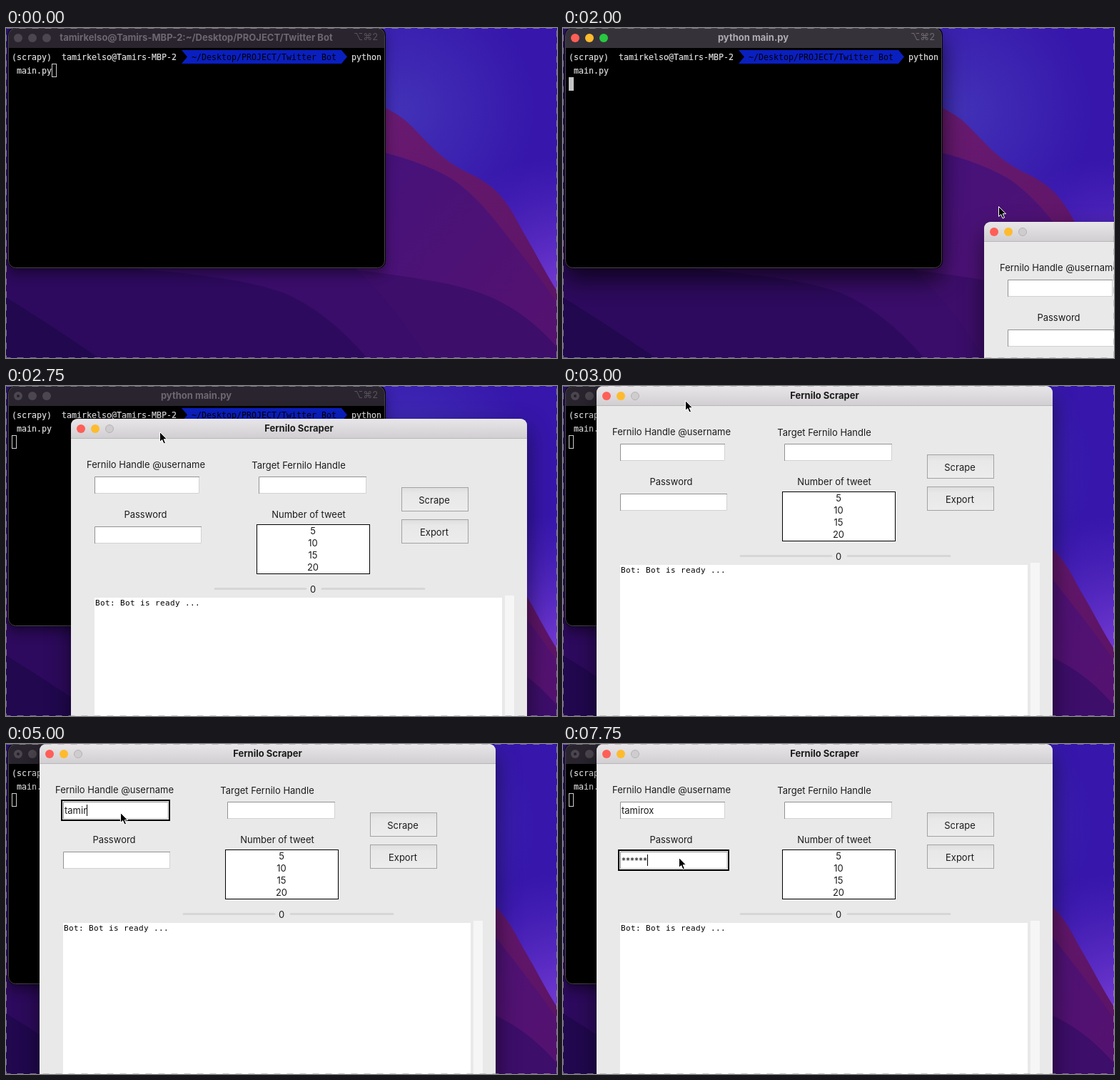
An HTML page for the animation above (8000 ms loop, 772x463 px).

```html
<!DOCTYPE html>
<html lang="en">
<head>
<meta charset="utf-8">
<title>Scraper demo</title>
<style>
  html, body { margin: 0; width: 100%; height: 100%; overflow: hidden; background: #2b0a5c; }
  svg { display: block; width: 772px; height: 463px; }
  text { font: 13px Inter, "Liberation Sans", sans-serif; fill: #1c1c1c; white-space: pre; }
  .mid { text-anchor: middle; }
  .bold { font-weight: 700; }
  .mono { font: 11.63px "DejaVu Sans Mono", monospace; fill: #dedede; stroke: #dedede; stroke-width: .2px; }
  .mono.path { fill: #000; stroke: none; }
  .log { font: 11px "DejaVu Sans Mono", monospace; letter-spacing: .38px; fill: #000; }
  .frame { filter: drop-shadow(0 8px 8px rgba(0, 0, 0, .4)); }
  .active .frame { filter: drop-shadow(0 16px 16px rgba(0, 0, 0, .65)); }
  #app .frame { filter: drop-shadow(0 14px 16px rgba(0, 0, 0, .55)); }
  .bar { fill: #29242e; }
  .active .bar { fill: #363239; }
  #termTitle { fill: #6c6770; }
  .active #termTitle { fill: #b0acb3; }
  .keys { fill: #57525b; }
  .active .keys { fill: #6f6a72; }
  .light { fill: #4b464f; }
  .active .red, #app .red { fill: #fe5f57; }
  .active .yellow, #app .yellow { fill: #febb2e; }
  .active .green { fill: #28c840; }
  .busy { fill: none; }
  .running:not(.active) .busy { fill: #25202a; }
  #block { fill: none; stroke: #d0d0d0; }
  .active #block { fill: #c4c4c4; stroke: #c4c4c4; }
  .ring { fill: none; stroke: #000; stroke-width: 2; }
</style>
</head>
<body>
<svg viewBox="0 0 772 463">
  <defs>
    <radialGradient id="glow" gradientUnits="userSpaceOnUse" cx="555" cy="115" r="190">
      <stop offset="0" stop-color="#4538ba" stop-opacity=".8"/><stop offset="1" stop-color="#4538ba" stop-opacity="0"/>
    </radialGradient>
    <radialGradient id="dusk" gradientUnits="userSpaceOnUse" cx="775" cy="360" r="180">
      <stop offset="0" stop-color="#7038d0"/><stop offset="1" stop-color="#5a2cc4" stop-opacity="0"/>
    </radialGradient>
    <linearGradient id="ridge" gradientUnits="userSpaceOnUse" x1="530" y1="110" x2="772" y2="400">
      <stop offset="0" stop-color="#681a70"/><stop offset="1" stop-color="#5c1466"/>
    </linearGradient>
    <linearGradient id="slope" gradientUnits="userSpaceOnUse" x1="530" y1="200" x2="772" y2="400">
      <stop offset="0" stop-color="#46127a"/><stop offset="1" stop-color="#541270"/>
    </linearGradient>
    <linearGradient id="appBar" x2="0" y2="1">
      <stop offset="0" stop-color="#e8e6e8"/><stop offset="1" stop-color="#d0ced0"/>
    </linearGradient>
    <linearGradient id="face" x2="0" y2="1">
      <stop offset="0" stop-color="#dedede"/><stop offset=".25" stop-color="#e8e8e8"/><stop offset="1" stop-color="#ececec"/>
    </linearGradient>
  </defs>

  <g id="wallpaper">
    <rect width="772" height="463" fill="#3616ab"/>
    <rect width="772" height="463" fill="url(#glow)"/>
    <rect width="772" height="463" fill="url(#dusk)"/>
    <path fill="url(#ridge)" d="M500 100Q535 110 560 130C590 158 605 182 645 202C690 222 703 245 725 287C738 308 756 344 772 369V463H300V120Z"/>
    <path fill="url(#slope)" d="M500 168Q575 183 622 210C665 237 700 290 732 330Q752 356 772 385V463H300V160Z"/>
    <rect width="300" height="463" fill="#2a1268"/>
    <path fill="#3d0e6a" d="M470 336C560 350 640 356 690 383Q735 405 772 448V463H400Z"/>
    <path fill="#390d69" d="M470 318Q500 345 530 380Q560 415 590 463H0V300Z"/>
    <path fill="#2d0a5d" d="M0 325C240 340 330 350 390 372Q450 398 506 463H0Z"/>
    <path fill="#21084f" d="M0 378Q60 415 130 463H0Z"/>
  </g>

  <g id="term">
    <rect class="frame" x="2.500" y="-1" width="529.500" height="338.500" rx="11" fill="#000"/>
    <path class="bar" d="M4 28V10Q4 0 14 0H520Q530 0 530 10V28Z"/>
    <rect x="3.5" y=".5" width="527" height="336" rx="10" fill="none" stroke="#4a464e"/>
    <circle class="light red" cx="17" cy="14" r="6"/>
    <circle class="busy" cx="17" cy="14" r="2"/>
    <circle class="light yellow" cx="37" cy="14" r="6"/>
    <circle class="light green" cx="57" cy="14" r="6"/>
    <text id="termTitle" class="mid bold" x="266.500" y="18"></text>
    <text class="keys" x="487" y="17">⌥⌘2</text>
    <path fill="#0a1fc0" d="M246 31H470L478 40.500L470 50H246L254 40.500Z"/>
    <text class="mono" x="8" y="45">(scrapy)</text>
    <text class="mono" x="78" y="45">tamirkelso@Tamirs-MBP-2</text>
    <text class="mono path" x="260" y="45">~/Desktop/PROJECT/Twitter Bot</text>
    <text class="mono" x="484" y="45">python</text>
    <text class="mono" x="15" y="64">main.py</text>
    <rect id="block" width="6" height="18"/>
  </g>

  <g id="app">
    <rect class="frame" width="639" height="520" rx="10" fill="#e9e9e9"/>
    <path fill="url(#appBar)" d="M0 28V10Q0 0 10 0H629Q639 0 639 10V28Z"/>
    <path stroke="#b9b7b9" d="M0 27.5H639"/>
    <circle class="red" cx="14" cy="14" r="6"/>
    <circle class="yellow" cx="34" cy="14" r="6"/>
    <circle cx="54" cy="14" r="5.5" fill="#cecccd" stroke="#b5b3b5"/>
    <text class="mid bold" x="319.5" y="18" fill="#333">Fernilo Scraper</text>
    <text class="mid" x="105" y="69">Fernilo Handle @username</text>
    <text class="mid" x="319" y="70">Target Fernilo Handle</text>
    <text class="mid" x="104.5" y="139">Password</text>
    <text class="mid" x="333" y="139">Number of tweet</text>
    <g id="widgets"></g>
    <rect x="260.5" y="148.5" width="158" height="69" fill="#fff" stroke="#000"/>
    <g id="counts"></g>
    <path stroke="#d6d6d6" stroke-width="3" stroke-linecap="round" d="M202 238.500H329M352 238.500H495"/>
    <text class="mid" x="339" y="244">0</text>
    <rect x="33" y="251" width="571" height="260" fill="#fff"/>
    <rect x="608" y="248" width="13" height="260" fill="#f6f6f6"/>
    <text class="log" x="34" y="262">Bot: Bot is ready ...</text>
    <rect id="ringUser" class="ring" x="31" y="79" width="151" height="28"/>
    <rect id="ringPass" class="ring" x="31" y="149" width="154" height="28"/>
    <text id="user" x="35" y="98"></text>
    <text id="pass" x="35" y="168" style="font-size:12px"></text>
    <rect id="caret" width="1" height="16" fill="#000"/>
  </g>

  <path id="mouse" fill="#000" stroke="#fff" stroke-width="1" stroke-linejoin="round"
    d="M.5 .5V14.500L3.700 11.500L6 17L8.500 16L6.200 10.700H10.500Z"/>
  <rect x=".5" y=".5" width="771" height="462" fill="none" stroke="#a8a4ac" stroke-opacity=".6" stroke-dasharray="9 9"/>
</svg>
<script>
const $ = id => document.getElementById(id);
const LOOP = 8000, TICK = 250;

const entry = (x, y, w) =>
  `<rect x="${x}" y="${y}" width="${w}" height="24" fill="#fff"/>
   <path d="M${x + .5} ${y + 24}V${y + .5}H${x + w}" fill="none" stroke="#929292"/>
   <path d="M${x + w - .5} ${y + 1}V${y + 23.5}H${x + 1}" fill="none" stroke="#d2d2d2"/>`;
const button = (y, label) =>
  `<rect x="463.5" y="${y + .5}" width="93" height="33" fill="url(#face)" stroke="#a2a2a2"/>
   <text class="mid" x="509" y="${y + 23}">${label}</text>`;

$('widgets').innerHTML = entry(33, 81, 147) + entry(263, 81, 151) + entry(33, 151, 150)
  + button(96, 'Scrape') + button(141, 'Export');
$('counts').innerHTML = [5, 10, 15, 20]
  .map((n, i) => `<text class="mid" x="339" y="${162 + 17 * i}">${n}</text>`).join('');

// Each track lists [start in ms, value]; a value holds until the next start.
const tracks = {
  active: [[0, false], [250, true], [2250, false]],
  running: [[0, false], [500, true]],
  title: [[0, 'tamirkelso@Tamirs-MBP-2:~/Desktop/PROJECT/Twitter Bot'], [750, 'python main.py']],
  block: [[0, [64.5, 50.5]], [500, [8.5, 69.5]]],
  app: [[0, null], [2000, [590, 272]], [2750, [91, 46]], [3000, [47, 0]]],
  mouse: [[0, null], [1500, [440, 180]], [1750, [520, 214]], [2000, [610, 250]], [2250, [690, 280]],
    [2500, [710, 286]], [2750, [215, 64]], [3000, [171, 20]], [3250, [170, 54]],
    [3500, [160, 94]], [3750, [157, 97]], [4000, [160, 96]], [6250, [162, 155]], [6500, [162, 159]]],
  focus: [[0, ''], [3750, 'user'], [6500, 'pass']],
  user: [[0, 0], [4500, 1], [4750, 3], [5000, 5], [5250, 7]],
  pass: [[0, 0], [6750, 1], [7000, 3], [7250, 4], [7500, 5], [7750, 6]],
  caret: [[0, false], [3750, true], [5500, false], [6500, true]]
};
const at = (track, t) => track.findLast(([start]) => start <= t)[1];
const show = (el, on) => el.style.display = on ? '' : 'none';
const place = (el, pos) => {
  show(el, pos);
  if (pos) el.setAttribute('transform', `translate(${pos})`);
};

function draw(t) {
  const s = {};
  for (const key in tracks) s[key] = at(tracks[key], t);
  $('term').classList.toggle('active', s.active);
  $('term').classList.toggle('running', s.running);
  $('termTitle').textContent = s.title;
  place($('block'), s.block);
  place($('app'), s.app);
  place($('mouse'), s.mouse);
  $('user').textContent = 'tamirox'.slice(0, s.user);
  $('pass').textContent = '*'.repeat(s.pass);
  show($('ringUser'), s.focus === 'user');
  show($('ringPass'), s.focus === 'pass');
  const width = s.focus && s[s.focus] ? $(s.focus).getComputedTextLength() + 1 : 0;
  place($('caret'), s.caret && [34 + Math.round(width), s.focus === 'pass' ? 155 : 85]);
}

const begin = performance.now();
let last = -1;
function loop() {
  const t = (performance.now() - begin) % LOOP;
  const tick = Math.floor(t / TICK);
  if (tick !== last) draw(t);
  last = tick;
  requestAnimationFrame(loop);
}
loop();
</script>
</body>
</html>
```
